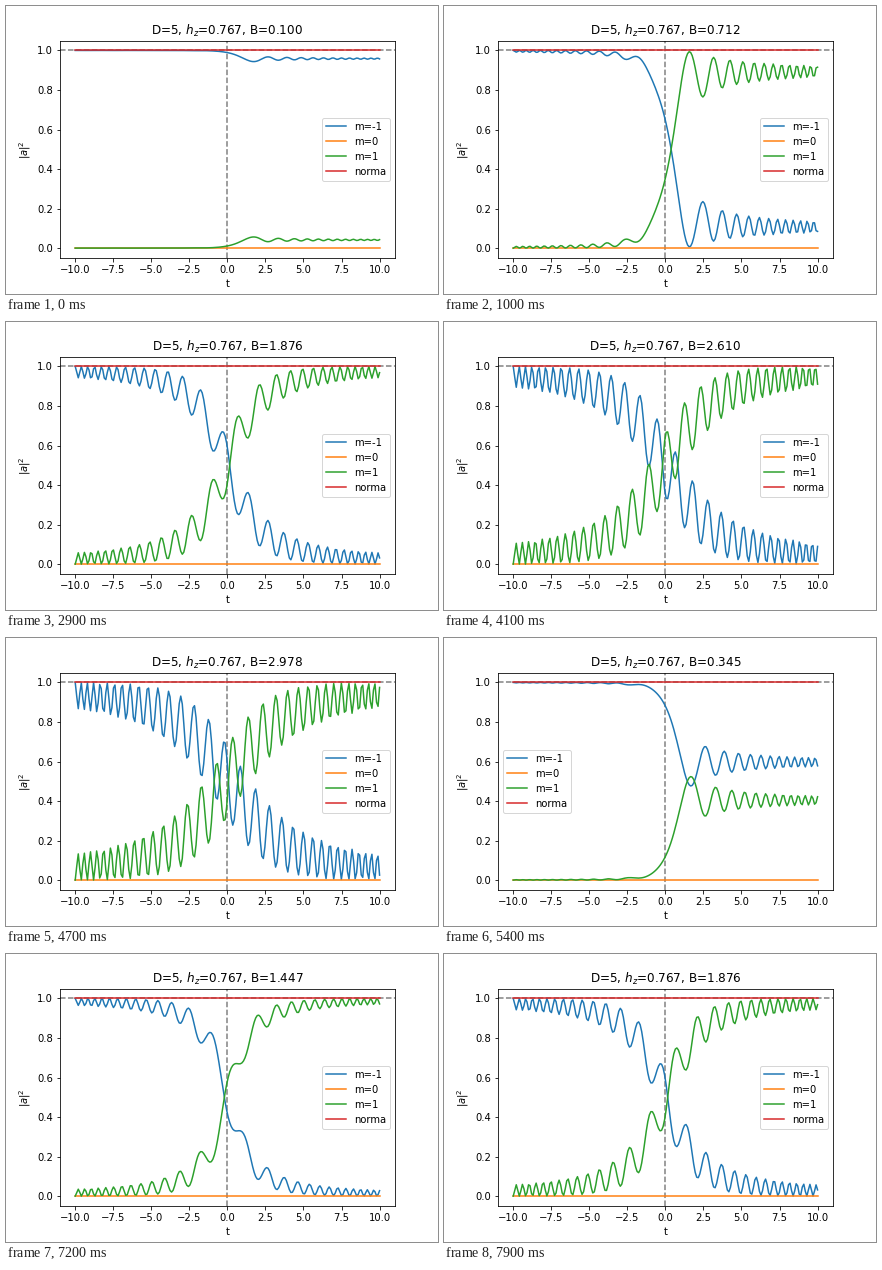
Write a matplotlib script that moves like this. It is 432 by 288 pixels and loops after 8000 ms.

```python
import numpy as np
import matplotlib.pyplot as plt
from matplotlib.animation import FuncAnimation

D, HZ = 5, 0.767
FIELDS = np.linspace(0.1, 3.1, 50)
TIMES = np.linspace(-10, 10, 200)
FRAMES, INTERVAL = 80, 100
SUBSTEPS = 12


def evolve(b):
    """Populations of m=-1 and m=+1 for H = HZ t Sz + b (Sx^2 - Sy^2)."""
    down = np.ones_like(b, dtype=complex)
    up = np.zeros_like(down)
    dt = (TIMES[1] - TIMES[0]) / SUBSTEPS
    pops = [(abs(down) ** 2, abs(up) ** 2)]
    for start in TIMES[:-1]:
        for k in range(SUBSTEPS):
            z = HZ * (start + (k + 0.5) * dt)
            w = np.hypot(z, b)
            c, s = np.cos(w * dt), -1j * np.sin(w * dt) / w
            down, up = ((c - s * z) * down + s * b * up,
                        (c + s * z) * up + s * b * down)
        pops.append((abs(down) ** 2, abs(up) ** 2))
    return np.moveaxis(np.array(pops), 0, -1)


p_down, p_up = evolve(FIELDS)

fig, ax = plt.subplots(figsize=(6, 4), dpi=72)
fig.subplots_adjust(left=0.125, right=0.9, bottom=0.125, top=0.88)
ax.axhline(1, ls="--", color="gray")
ax.axvline(0, ls="--", color="gray")

flat = np.zeros_like(TIMES)
line_down, = ax.plot(TIMES, p_down[0], "C0", label="m=-1")
ax.plot(TIMES, flat, "C1", label="m=0")
line_up, = ax.plot(TIMES, p_up[0], "C2", label="m=1")
ax.plot(TIMES, flat + 1, "C3", label="norma")

ax.set_xlim(-11, 11)
ax.set_ylim(-0.05, 1.05)
ax.set_xlabel("t")
ax.set_ylabel("$|a|^2$")
title = ax.set_title("")
ax.legend(loc="best")


def draw(frame):
    i = frame % len(FIELDS)
    line_down.set_ydata(p_down[i])
    line_up.set_ydata(p_up[i])
    title.set_text(f"D={D}, $h_z$={HZ:.3f}, B={FIELDS[i]:.3f}")
    return line_down, line_up, title


anim = FuncAnimation(fig, draw, frames=FRAMES, init_func=lambda: draw(0),
                     interval=INTERVAL, repeat=True, repeat_delay=0)
plt.show()
```
